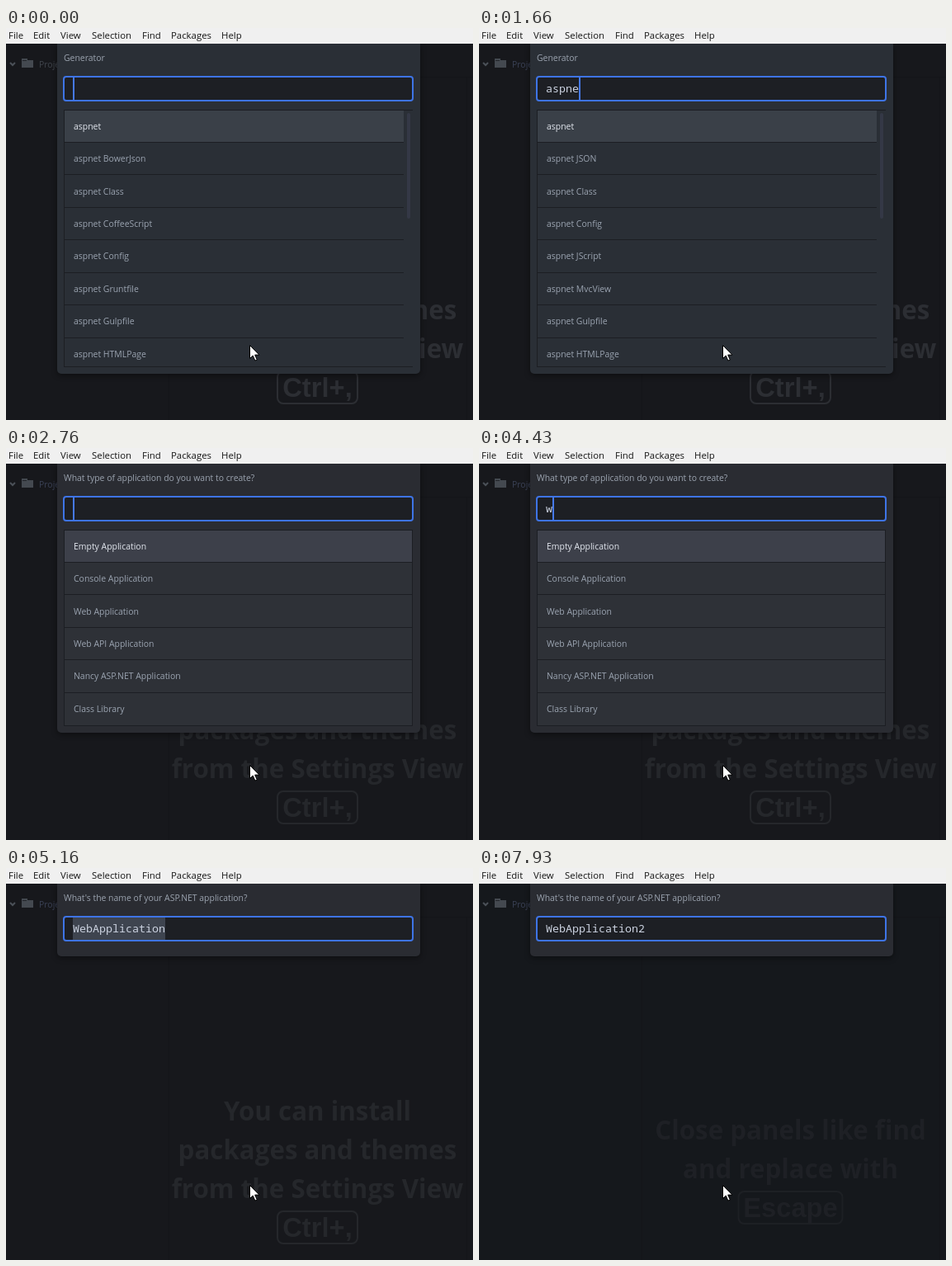
Animation, 566 px wide and 475 px high, one loop 8 s. Source, as an HTML page with a canvas:

```html
<!DOCTYPE html>
<html lang="en">
<head>
<meta charset="utf-8">
<title>Generator</title>
<style>
html, body { margin: 0; width: 100%; height: 100%; overflow: hidden; background: #17181c; }
canvas { display: block; }
</style>
</head>
<body>
<canvas id="stage" width="566" height="475"></canvas>
<script>
const g = document.getElementById('stage').getContext('2d');
const LOOP = 8000;
const UI = '"Open Sans", "Noto Sans", sans-serif';
const MONO = '"Noto Sans Mono", "DejaVu Sans Mono", monospace';
const SMALL = '10.45px ' + UI;

const menu = [['File', 3], ['Edit', 33], ['View', 66], ['Selection', 104],
  ['Find', 165], ['Packages', 200], ['Help', 261]];

const aspnet = names => ['aspnet', ...names.split(' ').map(n => 'aspnet ' + n)];
const askType = 'What type of application do you want to create?';
const warm = { panel: '#2a2c32', row: '#2e3137', active: '#3d404a' };
const cool = { panel: '#2a2f36', row: '#2a2f36', active: '#3a4048' };

const screens = {
  all: { title: 'Generator', bottom: 419, scroll: true, look: cool,
    items: aspnet('BowerJson Class CoffeeScript Config Gruntfile Gulpfile HTMLPage') },
  filtered: { title: 'Generator', bottom: 419, scroll: true, look: cool,
    items: aspnet('JSON Class Config JScript MvcView Gulpfile HTMLPage') },
  types: { title: askType, bottom: 345, look: warm,
    items: ['Empty Application', 'Console Application', 'Web Application',
      'Web API Application', 'Nancy ASP.NET Application', 'Class Library'] },
  web: { title: askType, bottom: 187, look: warm,
    items: ['Web Application', 'Web API Application'] },
  name: { title: "What's the name of your ASP.NET application?", bottom: 107, look: warm, items: [] }
};

// start time, screen, typed text, blinks
const steps = [
  [0, 'all', '', true],
  [1110, 'all', 'a'],
  [1290, 'filtered', 'asp'],
  [1660, 'filtered', 'aspne'],
  [1840, 'types', ''],
  [2020, 'types', '', true],
  [4430, 'types', 'w'],
  [4620, 'web', 'we'],
  [4790, 'web', 'web'],
  [5160, 'name', 'WebApplication', false, true],
  [6460, 'name', 'WebApplication', true],
  [7570, 'name', 'WebApplication2', true]
];
const BLINK = 370;

const installTip = { lines: ['You can install', 'packages and themes', 'from the Settings View'],
  key: 'Ctrl+,', base: 306, width: 97 };
const closeTip = { lines: ['Close panels like find', 'and replace with'],
  key: 'Escape', base: 329, width: 126 };

function rect(x, y, w, h, color) {
  g.fillStyle = color;
  g.fillRect(x, y, w, h);
}

function text(str, x, y, font, color, align = 'left') {
  g.font = font;
  g.fillStyle = color;
  g.textAlign = align;
  g.fillText(str, x, y);
}

function path(points, close) {
  g.beginPath();
  points.forEach(([x, y]) => g.lineTo(x, y));
  if (close) g.closePath();
}

function box(x, y, w, h, r) {
  g.beginPath();
  g.roundRect(x, y, w, h, r);
}

function drawTip(tip, color, alpha) {
  const mid = 377.5;
  g.globalAlpha = alpha;
  tip.lines.forEach((s, i) => text(s, mid, tip.base + 47 * i, 'bold 31.3px ' + UI, color, 'center'));
  const y = tip.base + 47 * tip.lines.length;
  text(tip.key, mid, y, 'bold 32.7px "Liberation Sans", Arial, sans-serif', color, 'center');
  g.strokeStyle = color;
  g.lineWidth = 2;
  box(mid - tip.width / 2, y - 31, tip.width, 39, 7);
  g.stroke();
  g.globalAlpha = 1;
}

function drawBack(t) {
  const lit = t >= 1840 && t < 2020;
  const late = t >= 7570;
  rect(0, 0, 566, 475, lit ? '#1f2125' : late ? '#15181c' : '#17181c');

  const edge = lit ? '#191b1f' : '#141519';
  rect(197, 19, 1, 456, edge);
  rect(558, 60, 1, 415, edge);
  rect(198, 59, 368, 1, edge);

  g.strokeStyle = lit ? '#5c8a7c' : '#4b5058';
  g.lineWidth = 2;
  path([[5, 42], [8, 45], [11, 42]]);
  g.stroke();
  const folder = lit ? '#555b64' : '#444950';
  rect(19, 37, 7, 3, folder);
  rect(19, 39, 14, 9, folder);
  rect(20, 39, 5, 1, lit ? '#2c3036' : '#23262b');
  text('Project', 40, 47.5, SMALL, lit ? '#5d6488' : t < 1290 ? '#40454d' : '#3b4256');

  if (t >= 7930) drawTip(closeTip, '#24262b', 0.6);
  else drawTip(installTip, lit ? '#2f3237' : t < 1840 ? '#2c2e33' : '#25272b', late ? 0.4 : 1);
}

function drawList(s) {
  const { items, scroll, look } = s;
  const top = 99, pitch = 39.45, line = '#1c1e23';
  const right = scroll ? 482 : 492;
  const end = scroll ? 410 : Math.round(top + pitch * items.length);
  rect(70, top, right - 70, end - top, look.row);
  rect(71, top + 1, right - 71, 38, look.active);
  rect(70, top, 423, 1, line);
  rect(70, top, 1, end - top, line);
  rect(70, end, 423, 1, line);
  if (scroll) {
    g.fillStyle = '#343846';
    box(486, 103, 4, 128, 2);
    g.fill();
  } else {
    rect(492, top, 1, end - top, line);
  }
  items.forEach((name, i) => {
    if (i) rect(70, Math.floor(top + pitch * i), right - 70, 1, line);
    text(name, 82, Math.round(122.6 + pitch * i), SMALL, i ? '#9ba4b1' : '#e3e7ef');
  });
}

function drawPanel(s) {
  g.save();
  g.shadowColor = 'rgba(0,0,0,.45)';
  g.shadowBlur = 7;
  g.shadowOffsetY = 2;
  g.fillStyle = s.look.panel;
  box(62, 19, 440, s.bottom - 19, [0, 0, 5, 5]);
  g.fill();
  g.restore();
  text(s.title, 70, 40, SMALL, '#9ba3af');
  if (s.items.length) drawList(s);
}

function drawInput(str, caret, selected) {
  g.fillStyle = '#1d1f24';
  g.strokeStyle = '#3e74e6';
  g.lineWidth = 2;
  box(70, 59, 423, 29, 3);
  g.fill();
  g.stroke();
  const end = 81 + 8 * str.length;
  if (selected) rect(81, 60, end - 81, 27, '#3e444f');
  text(str, 81, 78, '500 13.333px ' + MONO, '#cbd2e0');
  if (caret) rect(end, 60, 2, 27, '#4679ea');
}

function drawMenu() {
  rect(0, 0, 566, 19, '#f0f0f0');
  menu.forEach(([s, x]) => text(s, x, 13, '11.4px ' + UI, '#151515'));
}

function drawPointer() {
  const shape = [[0, 0], [0, 16], [3.7, 12.5], [6.4, 18.6], [8.8, 17.6], [6.2, 11.6], [11.4, 11.6]];
  path(shape.map(([x, y]) => [x + 295.5, y + 384.5]), true);
  g.fillStyle = '#fff';
  g.strokeStyle = '#000';
  g.lineWidth = 1;
  g.fill();
  g.stroke();
}

function draw(t) {
  const [start, id, str, blink, selected] = steps.findLast(s => s[0] <= t);
  // the caret starts hidden when the selection is dropped
  const phase = Math.floor((t - start) / BLINK) + (start === 6460 ? 1 : 0);
  const caret = !selected && !(blink && (phase % 2 || t >= 7930));
  drawBack(t);
  drawPanel(screens[id]);
  drawInput(str, caret, selected);
  drawMenu();
  drawPointer();
}

const began = performance.now();
function tick() {
  draw((performance.now() - began) % LOOP);
  requestAnimationFrame(tick);
}
tick();
</script>
</body>
</html>
```
